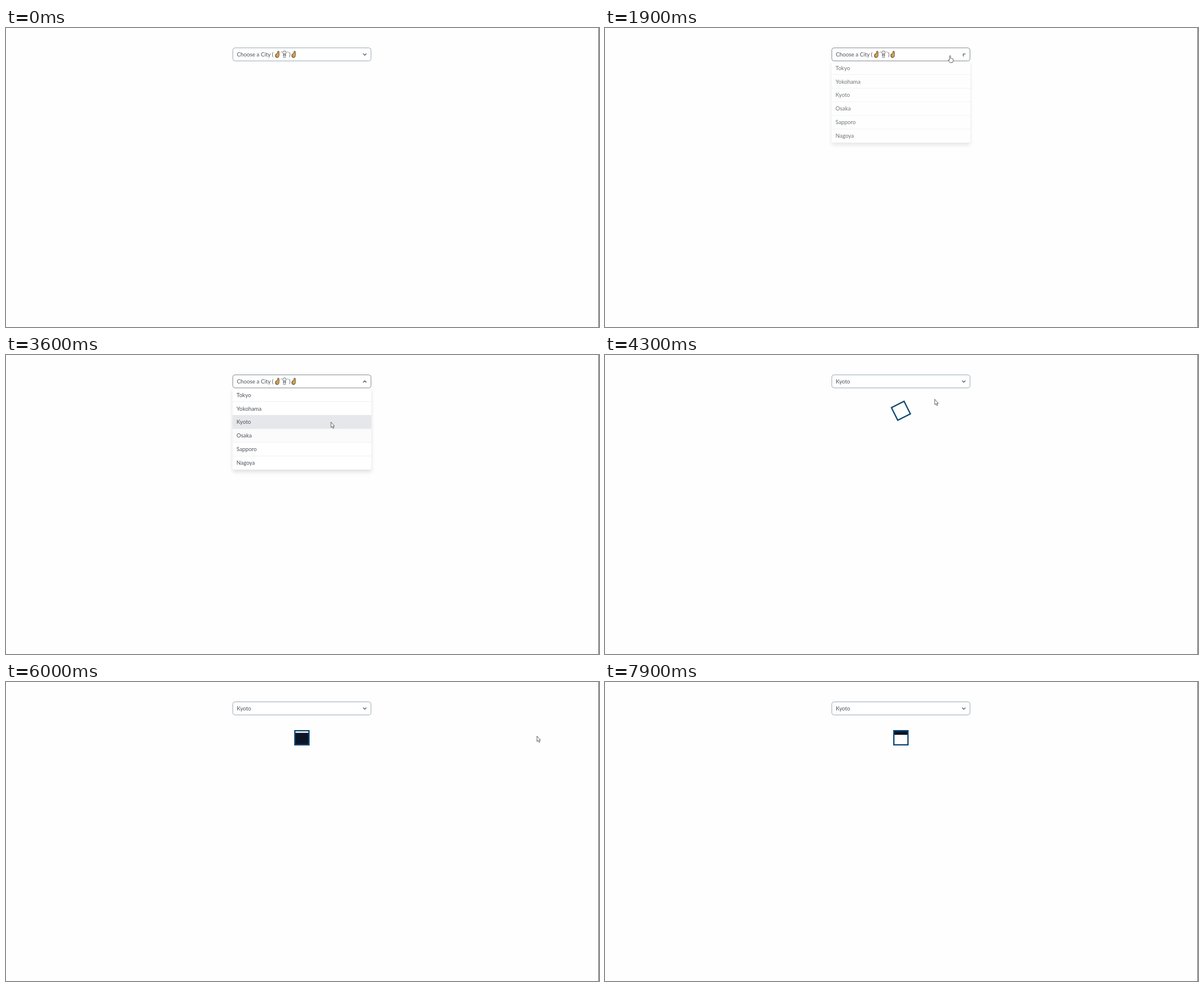
An HTML page that plays this animation: 1000x504 px, repeating every 8000 ms.

```html
<!DOCTYPE html>
<html lang="en">
<head>
<meta charset="utf-8">
<title>City select</title>
<style>
  html, body { margin: 0; width: 100%; height: 100%; overflow: hidden; background: #fefefe; }
  svg { display: block; width: 100vw; height: 100vh; }
  text { font: 9.35px Lato, "Open Sans", sans-serif; fill: #4d5157; }
  #menu { filter: drop-shadow(0 4px 3px rgba(0, 0, 0, .12)); }
</style>
</head>
<body>
<svg viewBox="0 0 1000 504" xmlns="http://www.w3.org/2000/svg">
  <defs>
    <g id="finger">
      <path d="M2 5.2 4.9 4V.9q1.3-1.5 2.5 0v6.5q-.1 3.6-3.1 3.8Q1.2 11 1.2 8z" fill="#e2ae5b" stroke="#4d3b20" stroke-width=".9"/>
      <path d="M1.6 6.4h3M1.5 8.2h3M2 9.8h2.6" stroke="#8c6428" stroke-width=".6"/>
    </g>
  </defs>
  <rect width="1000" height="504" fill="#fefefe"/>
  <rect x="999" width="1" height="504" fill="#66686b"/>

  <g id="menu">
    <path d="M382 55H616V190.2q0 3-3 3H385q-3 0-3-3z" fill="#fff"/>
    <g id="rows"></g>
  </g>

  <rect id="box" x="382.5" y="33.5" width="233" height="22" rx="3.7" fill="#fff"/>
  <g id="prompt">
    <text x="389.2" y="47.8">Choose a City (</text>
    <use href="#finger" x="453" y="38.8"/>
    <g fill="none" stroke="#555" stroke-width=".9">
      <path d="M463.4 41.4 465 39.6M474.6 39.6 476.2 41.4"/>
      <ellipse cx="469.6" cy="41.2" rx="2.9" ry="2.5"/>
      <path d="M468 43.6V48M471.3 43.6V48M467 45.6H472.3M467.2 49.2H472"/>
    </g>
    <text x="477.2" y="47.8">)</text>
    <use href="#finger" x="480.6" y="38.8"/>
  </g>
  <text id="choice" x="389.2" y="47.8">Kyoto</text>
  <path id="chevron" d="M-2.5-1.3 0 1.3 2.5-1.3" fill="none" stroke="#50545a" stroke-width="1.15" stroke-linecap="round" stroke-linejoin="round"/>

  <g id="loader">
    <rect id="fill" x="-11" y="-11" width="22" fill="#0c1526"/>
    <rect x="-11.9" y="-11.9" width="23.8" height="23.8" fill="none" stroke="#0f4873" stroke-width="2.2"/>
  </g>

  <g id="cursor" fill="#fff" stroke="#4b4d50" stroke-width=".85" stroke-linejoin="round">
    <path id="arrow" d="M0 0V9.2L2 7.5 3.5 10.7 5 10 3.6 7H6z"/>
    <path id="hand" d="M0 .7Q.9-.6 1.8.7V4.7Q2.7 3.8 3.4 5 4.4 4.2 5 5.4 6.1 4.9 6.1 6.4V8.8Q6 10.5 5 11.8H.7Q-.6 9.8-2.3 7.6-1.8 6.1 0 7.8z"/>
  </g>
</svg>
<script>
const LOOP = 8000, STEP = 100, SPIN_START = 4075;
const CITIES = ["Tokyo", "Yokohama", "Kyoto", "Osaka", "Sapporo", "Nagoya"];
const ROW_TOP = 55.6, ROW_H = 22.93;

// Pointer path: time, x, y
const PATH = [
  [300, 663, 129], [500, 613, 78], [700, 590, 53], [1000, 590, 53],
  [1200, 581, 46.5], [1900, 581, 46.5], [2100, 579, 62], [2500, 570, 167],
  [3100, 570, 167], [3400, 556, 134], [3500, 551, 126], [3600, 548, 113],
  [4000, 548, 113], [4200, 552, 96], [4300, 556, 74.5], [4800, 657, 79],
  [4900, 780, 85], [5000, 906, 93], [5100, 895.4, 91]
];

const $ = id => document.getElementById(id);
const clamp = v => Math.min(1, Math.max(0, v));
const show = (id, on) => $(id).setAttribute("visibility", on ? "visible" : "hidden");
const set = (id, name, value) => $(id).setAttribute(name, value);

function bezier(x1, y1, x2, y2) {
  const at = (a, b, s) => 3 * a * s * (1 - s) ** 2 + 3 * b * s * s * (1 - s) + s ** 3;
  return x => {
    let lo = 0, hi = 1;
    for (let i = 0; i < 24; i++) {
      const mid = (lo + hi) / 2;
      if (at(x1, x2, mid) < x) lo = mid; else hi = mid;
    }
    return at(y1, y2, (lo + hi) / 2);
  };
}
const ease = bezier(.25, .1, .25, 1);
const easeIn = bezier(.42, 0, 1, 1);

$("rows").innerHTML = CITIES.map((city, i) => {
  const y = ROW_TOP + i * ROW_H;
  const line = i < CITIES.length - 1
    ? `<path d="M382 ${y + ROW_H}H616" stroke="#eef0f1" stroke-width=".9"/>` : "";
  return `<rect class="row" x="382" y="${y}" width="234" height="${ROW_H}" fill="#e5e7eb"/>
    ${line}<text x="388.8" y="${y + 15}">${city}</text>`;
}).join("");
const rows = [...document.querySelectorAll(".row")];

function pointer(t) {
  const i = PATH.findIndex(p => p[0] > t);
  if (i < 0) return PATH[PATH.length - 1].slice(1);
  if (i === 0) return PATH[0].slice(1);
  const [a, b] = [PATH[i - 1], PATH[i]], k = (t - a[0]) / (b[0] - a[0]);
  return [a[1] + (b[1] - a[1]) * k, a[2] + (b[2] - a[2]) * k];
}

const overBox = (x, y) => x > 382 && x < 616 && y > 33 && y < 56;

// A row keeps a faint tint for one step after the pointer leaves
function hover(row, t) {
  const inside = s => s >= 1900 && Math.floor((pointer(s)[1] - ROW_TOP) / ROW_H) === row;
  return inside(t) ? 1 : inside(t - STEP) ? .18 : 0;
}

function drawLoader(t) {
  show("loader", t >= SPIN_START);
  if (t < SPIN_START) return;
  const phase = (t - SPIN_START) % 4000 / 1000;
  const turn = 180 * (ease(clamp(phase)) + ease(clamp(phase - 2)));
  const level = easeIn(clamp(phase - 1)) - easeIn(clamp(phase - 3));
  set("loader", "transform", `translate(499 94) rotate(${turn})`);
  set("fill", "height", 22 * level);
}

function draw(t) {
  const open = clamp((t - 1820) / 100) * clamp((4130 - t) / 150);
  const flip = clamp((t - 1790) / 150) - clamp((t - 3960) / 150);
  const picked = t >= 4000;
  set("menu", "opacity", open);
  rows.forEach((row, i) => row.setAttribute("opacity", hover(i, t)));
  show("prompt", !picked);
  show("choice", picked);
  set("chevron", "transform", `translate(605 44.7) rotate(${180 * flip})`);

  const [x, y] = pointer(t), onBox = overBox(x, y);
  set("box", "stroke", open > 0 || onBox ? "#8c9298" : "#a0b0b8");
  show("cursor", t >= 300 && t < 7500);
  set("cursor", "transform", `translate(${x} ${y})`);
  set("arrow", "display", onBox ? "none" : "inline");
  set("hand", "display", onBox ? "inline" : "none");
  drawLoader(t);
}

function tick() {
  draw(Math.floor(performance.now() % LOOP / STEP) * STEP);
  requestAnimationFrame(tick);
}
tick();
</script>
</body>
</html>
```
